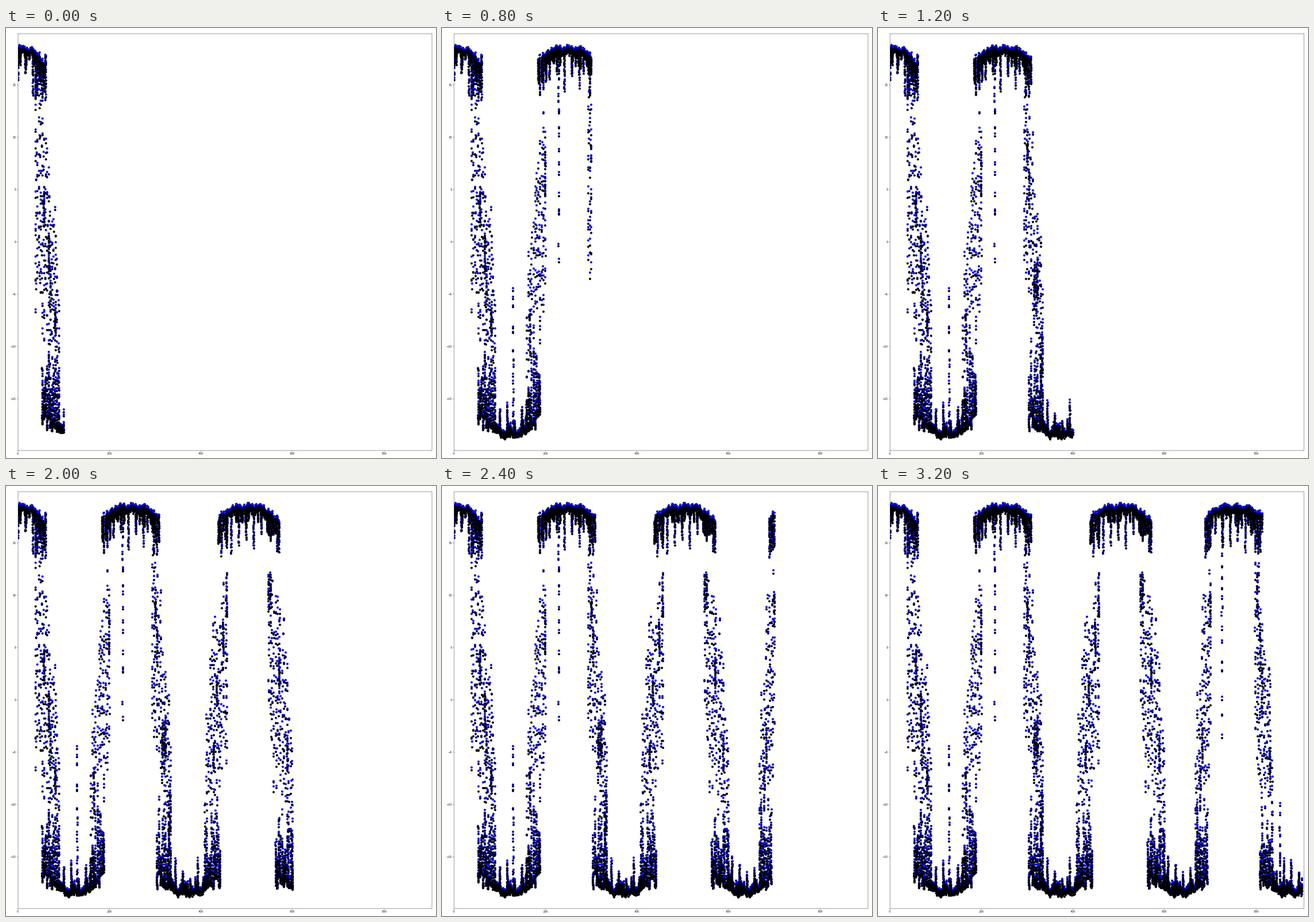
A matplotlib script for the animation above (3600 ms loop, 748 by 748 pixels).

```python
import numpy as np
import matplotlib.pyplot as plt
from matplotlib.animation import FuncAnimation

SIZE, DPI = 748, 88
PX = 72 / DPI                      # one pixel in points
LEFT, RIGHT, TOP, BOTTOM = 20.5, 740.5, 9.5, 734.5
X_MAX, Y_MAX = 904, 19.95
FRAMES, STEP = 9, 100
CEILING, FLOOR = 18.3, -18.5
TIGHT, LOOSE = (.1, .35), (.05, .7)

# Stage columns between which the state switches wells, first downwards.
SWINGS = [(51, 92), (147, 181), (254, 286), (346, 384),
          (457, 498), (552, 581), (656, 686)]
# Rare long excursions out of a resting well: column, tip.
ESCAPES = [(123.5, -3.2), (203, -2.4), (598, -4), (699, -10)]

rng = np.random.default_rng(7)
xs, ys, gaps = [], [], []


def put(col, y, gap):
    """Store dots; gap is how far the blue dot sits above the black one."""
    col = col + rng.uniform(-.6, .6, y.size)
    xs.append((col - LEFT) * X_MAX / (RIGHT - LEFT))
    ys.append(y)
    gaps.append(rng.uniform(*gap, y.size))


def strip(col, start, end, n, power=1.0, gap=TIGHT):
    """A column of n dots, crowded near start when power is above 1."""
    n = int(n)
    s = (np.arange(n) + rng.random(n)) / n
    put(col, start + (end - start) * s ** power, gap)


def spike(col, base, tip):
    h = abs(tip - base)
    strip(col, base, tip, 4 + 5 * min(h, 2.5) + .6 * h, 1 + min(h, 12) / 8)


def rest(c0, c1, level):
    """Noise band in one well, with spikes that grow towards both ends."""
    inward = -np.sign(level)
    depth = 1.5 if level > 0 else 1

    def edge(c):
        return abs(2 * (c - c0) / (c1 - c0) - 1) ** 4

    def base(c):
        wave = .14 * np.sin(c * .3 + c0) + .09 * np.sin(c * .9)
        return level + wave + inward * .5 * edge(c)

    cols = np.arange(c0, c1, .4)
    put(cols, base(cols) + rng.normal(0, .12, cols.size), (.12, .28))
    for c in np.arange(c0, c1, 2.7):
        h = .25 + depth * (1 + edge(c)) * rng.random() ** 2
        spike(c, base(c), base(c) + inward * h)
    for c in np.arange(c0 + 7, c1 - 4, 13) + rng.uniform(-2, 2):
        h = depth * rng.uniform(1.3, 3.2)
        spike(c, base(c), base(c) + inward * h)


def swing(c0, c1, falling):
    """Columns of dots hopping between the wells."""
    cols = np.arange(c0, c1, 2.9)
    for c in cols + rng.uniform(-.5, .5, cols.size):
        t = np.clip((c - c0) / (c1 - c0), 0, 1)
        up = 1 - t if falling else t       # 1 beside the upper well
        if up < .75:
            base = FLOOR + .3 + 3 * up * rng.random()
            spike(c, base, base + rng.uniform(2.5, 7.5))
        if up > .55:
            base = CEILING - .4 - 2.5 * (1 - up) * rng.random()
            spike(c, base, base - rng.uniform(1.5, 4.5))
        hi = -6 + 21 * up ** .6 + rng.uniform(-4, 3)
        lo = -16 + 10 * up + rng.uniform(-2, 5)
        if hi > lo:
            strip(c, hi, lo, 2 + .6 * (hi - lo), gap=LOOSE)
        if rng.random() < .3:
            hi = -11 + 24 * up + rng.uniform(-3, 3)
            strip(c, hi, hi - rng.uniform(2, 5), 11)


edges = [0, *np.ravel(SWINGS), 760]
for k, (c0, c1) in enumerate(zip(edges[::2], edges[1::2])):
    rest(c0, c1, FLOOR if k % 2 else CEILING)
for k, (c0, c1) in enumerate(SWINGS):
    swing(c0, c1, falling=k % 2 == 0)
for col, tip in ESCAPES:
    base = FLOOR if any(a < col < b for a, b in zip(edges[2::4], edges[3::4])) else CEILING
    spike(col, base, tip)

x, y, gap = map(np.concatenate, (xs, ys, gaps))
y = np.clip(y, -18.85, 18.6)

fig = plt.figure(figsize=(SIZE / DPI, SIZE / DPI), dpi=DPI, facecolor="white")
ax = fig.add_axes([LEFT / SIZE, 1 - BOTTOM / SIZE,
                   (RIGHT - LEFT) / SIZE, (BOTTOM - TOP) / SIZE])
ax.set(xlim=(0, X_MAX), ylim=(-Y_MAX, Y_MAX),
       xticks=range(0, 801, 200), yticks=range(-15, 16, 5))
ax.tick_params(labelsize=4.6 * PX, length=1.6 * PX, width=.4 * PX, pad=1.6 * PX)
for side in ax.spines.values():
    side.set_linewidth(.4 * PX)

dots = dict(ls="none", marker="o", ms=4 * PX, mew=0)
blue, = ax.plot([], [], color="blue", zorder=2, **dots)
black, = ax.plot([], [], color="black", zorder=2.1, **dots)


def draw(i):
    seen = (x >= 0) & (x <= STEP * (i + 1))
    blue.set_data(x[seen], (y + gap)[seen])
    black.set_data(x[seen], y[seen])
    return blue, black


anim = FuncAnimation(fig, draw, frames=FRAMES, init_func=lambda: draw(0),
                     interval=400, repeat=True, repeat_delay=0)
plt.show()
```
